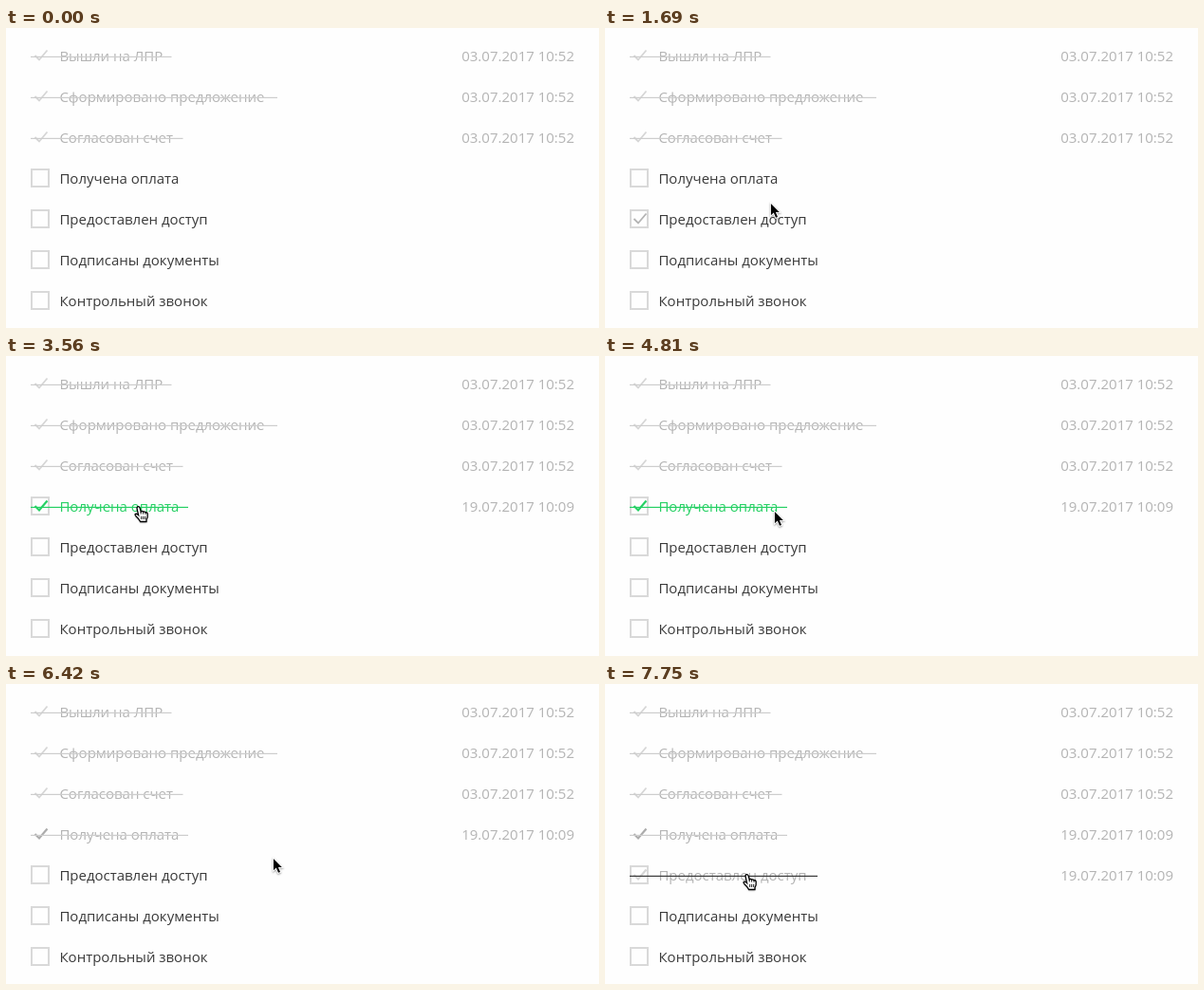
These frames come from a looping animation (625 px wide and 316 px high, 8000 ms). An HTML page with a canvas:

```html
<!DOCTYPE html>
<html lang="ru">
<head>
<meta charset="utf-8">
<title>Список задач</title>
<style>
html, body { margin: 0; width: 100%; height: 100%; overflow: hidden; background: #fefefe; }
canvas { display: block; width: 625px; height: 316px; }
</style>
</head>
<body>
<canvas id="stage"></canvas>
<script>
const W = 625, H = 316, LOOP = 8000;
const canvas = document.getElementById('stage');
const ctx = canvas.getContext('2d');
const ratio = window.devicePixelRatio || 1;
canvas.width = W * ratio;
canvas.height = H * ratio;

const DARK = [58, 58, 58], GREY = [180, 180, 180], LINE = [205, 205, 205];
const GREEN = [38, 208, 100], CHECK = [172, 172, 172], PALE = [214, 214, 214];
const OLD = '03.07.2017 10:52', NEW = '19.07.2017 10:09';

// strikeEnd: right end of the strike-through; clicked: time of the click
const rows = [
  { text: 'Вышли на ЛПР', strikeEnd: 174.5, date: OLD },
  { text: 'Сформировано предложение', strikeEnd: 286, date: OLD },
  { text: 'Согласован счет', strikeEnd: 186.5, date: OLD },
  { text: 'Получена оплата', strikeEnd: 192, date: NEW, clicked: 3210, left: 4720 },
  { text: 'Предоставлен доступ', strikeEnd: 224, date: NEW, clicked: 7580 },
  { text: 'Подписаны документы', strikeEnd: 235 },
  { text: 'Контрольный звонок', strikeEnd: 222 }
];
rows.forEach((row, i) => row.y = 29 + 43 * i);

const moves = [
  { start: 1340, end: 2130, hand: [135, 158], handAt: 2220, path: [[305, 283], [290, 264],
    [262, 240], [214, 210], [174, 184], [158, 174], [150, 168], [146, 164], [144, 162], [143, 161]] },
  { start: 4720, end: 5340, path: [[150, 161], [178, 163], [212, 166], [250, 170],
    [280, 175], [293, 177], [293, 177], [293, 177]] },
  { start: 6420, end: 6950, hand: [145, 200], handAt: 6950, path: [[281, 183], [254, 189],
    [222, 194], [190, 198], [166, 202], [153, 203], [153, 203]] }
];

const arrow = new Path2D('M.9 1V13.2L3.8 10.6L6 15.8L8 15L5.9 9.9H9.8Z');
const hand = new Path2D('M4.6 9.6L3.1 2.8Q2.8 .9 4.2 .7Q5.6 .5 6.2 2.4L7.2 6Q8.4 4.8 9.6 6.2' +
  'Q10.8 5.2 12 6.8Q13.8 6.2 14.2 8.4Q14.6 12 13 14.2V16.5H6.6Q5.6 14 2.2 11Q.4 9 1.4 8.4Q2.8 7.8 4.6 9.6Z');
const creases = new Path2D('M7.2 6V8.5M9.6 6.2V8.6M12 6.8V8.8M7.7 10.8V14M9.7 10.8V14M11.7 10.8V14');

const clamp = v => Math.max(0, Math.min(1, v));
const mix = (a, b, k) => a.map((v, i) => v + (b[i] - v) * clamp(k));
const rgb = (c, alpha = 1) => `rgba(${c.map(Math.round).join()},${alpha})`;

// Index of the current step among count steps spread from start to end
function stepAt(t, start, end, count) {
  return Math.floor((t - start) / (end - start) * (count - 1) + 0.1);
}

function pointerAt(t) {
  const move = moves.filter(m => t >= m.start).pop();
  if (!move) return null;
  const last = move.path.length - 1;
  const step = Math.min(last, stepAt(t, move.start, move.end, last + 1));
  return { tip: move.path[step], hand: t >= move.handAt ? move.hand : null };
}

function drawText(text, x, y, color, align = 'left') {
  ctx.fillStyle = color;
  ctx.textAlign = align;
  ctx.fillText(text, x, y + 6);
}

function drawCheck(y, color, width = 1.8) {
  ctx.strokeStyle = color;
  ctx.lineWidth = width;
  ctx.beginPath();
  ctx.moveTo(30.5, y);
  ctx.lineTo(35, y + 4.5);
  ctx.lineTo(43.5, y - 5.5);
  ctx.stroke();
}

function drawBox(y) {
  ctx.strokeStyle = '#d9d9d9';
  ctx.lineWidth = 2;
  ctx.strokeRect(27, y - 9, 18, 18);
}

function drawStrike(row, color, grow = 1) {
  ctx.fillStyle = color;
  ctx.fillRect(26, row.y + 0.8, (row.strikeEnd - 26) * grow, 1.2);
}

function isHovered(row, pointer) {
  if (!pointer) return false;
  const [x, y] = pointer.tip;
  return x < row.strikeEnd && Math.abs(y - row.y) <= 21;
}

function drawPending(row, pointer) {
  drawBox(row.y);
  if (isHovered(row, pointer)) drawCheck(row.y, rgb(pointer.hand ? LINE : GREY));
  drawText(row.text, 56.4, row.y, rgb(DARK));
}

function drawFinished(row) {
  drawCheck(row.y, rgb(PALE));
  drawText(row.text, 56.4, row.y, rgb(GREY));
  drawStrike(row, rgb(LINE));
  drawText(row.date, 599, row.y, rgb(GREY), 'right');
}

function drawClicked(row, t) {
  const step = Math.min(4, stepAt(t, row.clicked, row.clicked + 350, 5));
  const entry = clamp((step + 1) / 3);
  const green = (step - 2) / 2;
  const leave = row.left ? stepAt(t, row.left, 5340, 8) : -1;
  const fade = (leave - 3) / 4;
  const tint = (from, to) => rgb(mix(mix(from, GREEN, green), to, fade));
  if (leave < 3) drawBox(row.y);
  drawCheck(row.y, tint(PALE, CHECK), 2.2);
  drawText(row.text, 56.4, row.y, tint(mix(DARK, GREY, entry), GREY));
  drawStrike(row, tint(DARK, LINE), entry);
  drawText(row.date, 599, row.y, rgb(GREY, entry), 'right');
}

function drawPointer({ tip, hand: place }) {
  ctx.save();
  ctx.translate(...(place || tip));
  ctx.shadowColor = 'rgba(0,0,0,.4)';
  ctx.shadowBlur = 2 * ratio;
  ctx.shadowOffsetY = ratio;
  if (place) {
    ctx.fillStyle = '#fff';
    ctx.strokeStyle = '#000';
    ctx.lineWidth = 1.3;
    ctx.fill(hand);
    ctx.shadowColor = 'transparent';
    ctx.stroke(hand);
    ctx.lineWidth = 0.9;
    ctx.stroke(creases);
  } else {
    ctx.strokeStyle = '#fff';
    ctx.lineWidth = 1.8;
    ctx.stroke(arrow);
    ctx.shadowColor = 'transparent';
    ctx.fillStyle = '#000';
    ctx.fill(arrow);
  }
  ctx.restore();
}

function draw(t) {
  ctx.setTransform(ratio, 0, 0, ratio, 0, 0);
  ctx.fillStyle = '#fefefe';
  ctx.fillRect(0, 0, W, H);
  ctx.font = '15px "Open Sans", "Noto Sans", sans-serif';
  const pointer = pointerAt(t);
  for (const row of rows) {
    if (row.date && !row.clicked) drawFinished(row);
    else if (t >= row.clicked) drawClicked(row, t);
    else drawPending(row, pointer);
  }
  if (pointer) drawPointer(pointer);
}

const origin = performance.now();
function tick() {
  draw((performance.now() - origin) % LOOP);
  requestAnimationFrame(tick);
}
tick();
</script>
</body>
</html>
```
